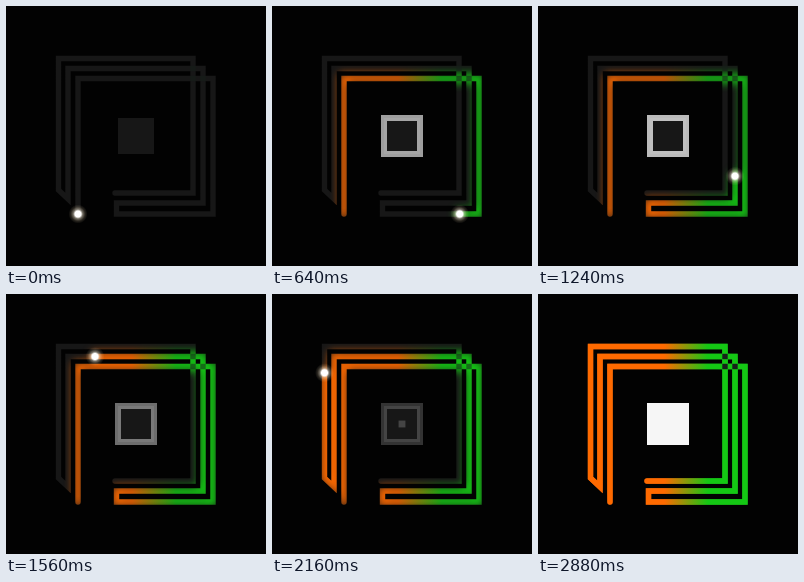
Animation of 260x260 px, one loop 3200 ms. Source, as an HTML page:

```html
<!DOCTYPE html>
<html lang="en">
<head>
<meta charset="utf-8">
<title>Line loop</title>
<style>
  html, body { margin: 0; width: 100%; height: 100%; overflow: hidden; background: #020202; }
  svg { display: block; width: 100vw; height: 100vh; }
  polyline { fill: none; stroke-width: 5.4; stroke-linecap: round; stroke-miterlimit: 4; }
  #trail { stroke: #fff; stroke-width: 9; }
</style>
</head>
<body>
<svg viewBox="0 0 260 260">
  <defs>
    <linearGradient id="hue" gradientUnits="userSpaceOnUse" x1="126" y1="0" x2="170" y2="0">
      <stop offset="0" stop-color="#ff6a00"/>
      <stop offset="1" stop-color="#14c814"/>
    </linearGradient>
    <radialGradient id="halo">
      <stop offset="0" stop-color="#fff"/>
      <stop offset=".32" stop-color="#fff"/>
      <stop offset=".5" stop-color="#fff5e0" stop-opacity=".45"/>
      <stop offset=".75" stop-color="#ffe8c0" stop-opacity=".15"/>
      <stop offset="1" stop-color="#ffe8c0" stop-opacity="0"/>
    </radialGradient>
    <filter id="blur" filterUnits="userSpaceOnUse" x="0" y="0" width="260" height="260">
      <feGaussianBlur stdDeviation="4"/>
    </filter>
    <mask id="reveal" maskUnits="userSpaceOnUse" x="0" y="0" width="260" height="260">
      <polyline id="trail" filter="url(#blur)"/>
    </mask>
  </defs>
  <rect width="260" height="260" fill="#020202"/>
  <polyline class="track" stroke="#171717"/>
  <g mask="url(#reveal)">
    <polyline class="track" stroke="url(#hue)"/>
  </g>
  <polyline class="track" id="full" stroke="url(#hue)"/>
  <g id="crossings" fill="#16201a"></g>
  <rect x="112" y="112" width="36" height="36" fill="#171717"/>
  <g id="center">
    <rect x="112" y="112" width="36" height="36" fill="none" stroke="#f6f6f6" stroke-width="6"/>
    <rect id="core" fill="#f6f6f6"/>
  </g>
  <circle id="head" r="9.5" fill="url(#halo)"/>
</svg>
<script>
const LOOP = 3200, STEP = 40, SEGMENT = 200, DRAWN = 2800;
const corners = [
  [72, 208], [72, 72.5], [207, 72.5], [207, 208], [110.5, 208], [110.5, 197],
  [197, 197], [197, 62.5], [62, 62.5], [62, 193], [52.5, 184],
  [52.5, 52.5], [187, 52.5], [187, 187], [109, 187]
];
const crossings = [[197, 72.5], [187, 62.5], [187, 72.5]];

const byId = id => document.getElementById(id);
const clamp = v => Math.min(1, Math.max(0, v));
const setAttrs = (el, attrs) => {
  for (const key in attrs) el.setAttribute(key, attrs[key]);
};

document.querySelectorAll(".track").forEach(el => setAttrs(el, { points: corners.join(" ") }));
for (const [x, y] of crossings) {
  const cell = document.createElementNS("http://www.w3.org/2000/svg", "rect");
  setAttrs(cell, { x: x - 2.7, y: y - 2.7, width: 5.4, height: 5.4 });
  byId("crossings").append(cell);
}

function headAt(t) {
  const pos = Math.min(t, DRAWN) / SEGMENT;
  const index = Math.min(Math.floor(pos), corners.length - 2);
  const [a, b] = [corners[index], corners[index + 1]];
  return { index, point: a.map((v, k) => v + (b[k] - v) * (pos - index)) };
}

function pulse(t) {
  if (t < 1000) return t / 1000;
  return t < 2000 ? 2 - t / 1000 : clamp((t - 2000) / 800);
}

function render(t) {
  const { index, point } = headAt(t);
  const finish = clamp((t - DRAWN) / 80);
  const points = [...corners.slice(0, index + 1), point].join(" ");
  setAttrs(byId("trail"), { points, visibility: t > 0 ? "visible" : "hidden" });
  setAttrs(byId("full"), { opacity: finish });
  // Crossings stay half lit until the whole line is shown.
  setAttrs(byId("crossings"), { opacity: 0.5 + 0.5 * finish });

  const size = 36 * clamp((t - 2000) / 840);
  setAttrs(byId("core"), { x: 130 - size / 2, y: 130 - size / 2, width: size, height: size });
  setAttrs(byId("center"), { opacity: pulse(t) });
  setAttrs(byId("head"), { cx: point[0], cy: point[1], opacity: 1 - finish });
}

const start = performance.now();
function tick() {
  const t = (performance.now() - start) % LOOP;
  render(Math.floor(t / STEP) * STEP);
  requestAnimationFrame(tick);
}
tick();
</script>
</body>
</html>
```
